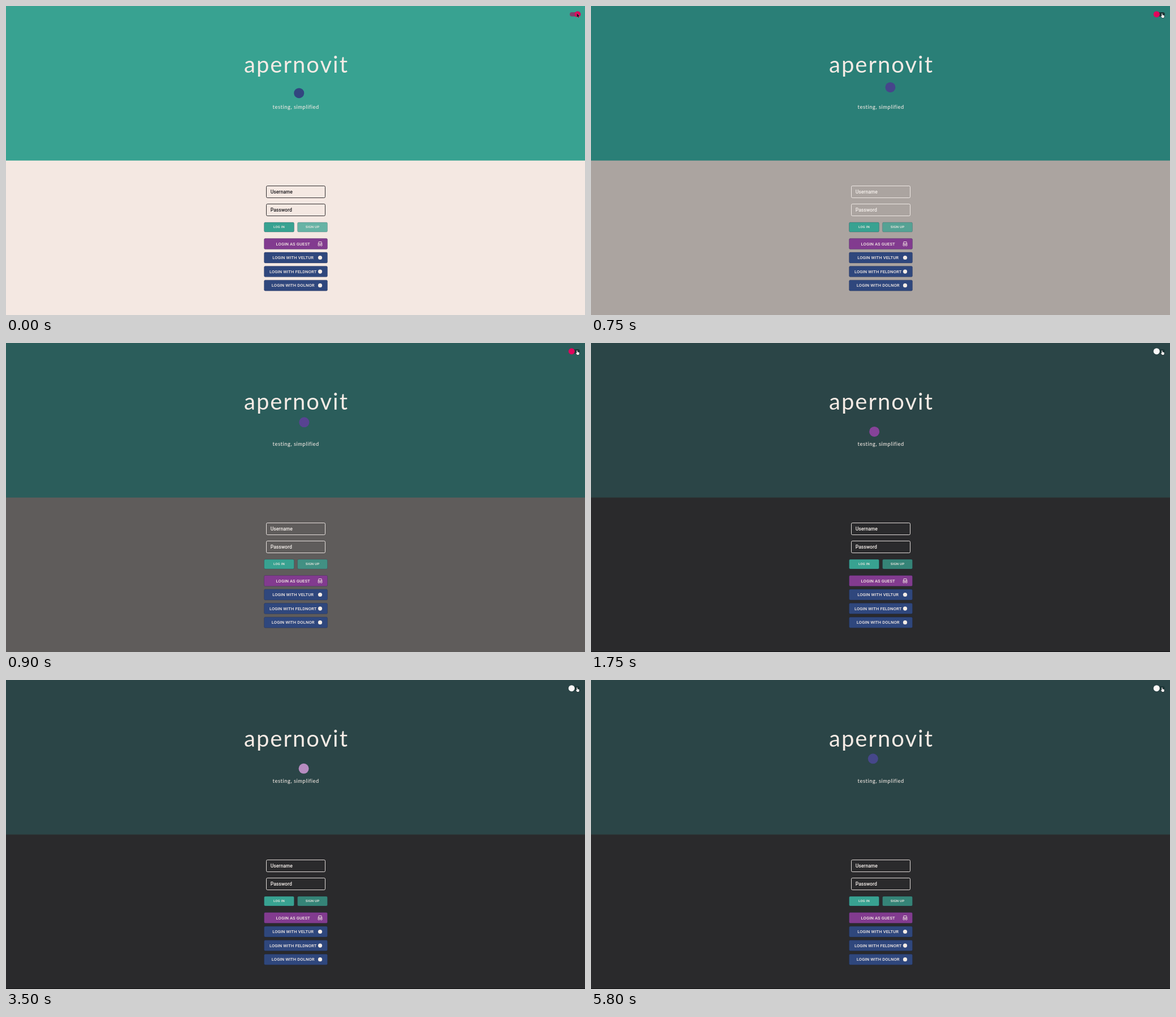
An HTML page with a canvas that plays this animation: 1024 px wide and 547 px high, repeating every 5850 ms.

```html
<!DOCTYPE html>
<html lang="en">
<head>
<meta charset="utf-8">
<title>Login</title>
<style>
  html, body { margin: 0; width: 100%; height: 100%; overflow: hidden; background: #2a2a2c; }
  canvas { display: block; width: 1024px; height: 547px; }
</style>
</head>
<body>
<canvas id="stage"></canvas>
<script>
const W = 1024, H = 547, LOOP = 5850, STEP = 50, SPLIT = 273.6;
const stage = document.getElementById('stage');
const dpr = window.devicePixelRatio || 1;
stage.width = W * dpr;
stage.height = H * dpr;
const ctx = stage.getContext('2d');

const PALE = [245, 235, 229];
const TEAL = '#38a291', PURPLE = '#823b8f', BLUE = '#2f477d';

// The badge fades from blue through lilac and back: [ms, r, g, b]
const BADGE = [
  [0, 50, 70, 127], [750, 70, 69, 139], [900, 88, 67, 146], [1750, 134, 67, 153],
  [3500, 183, 140, 192], [4650, 86, 70, 146], [5850, 69, 71, 138]
];

const clamp = v => Math.min(1, Math.max(0, v));
const span = (t, from, length) => clamp((t - from) / length);
const mix = (a, b, p) => a.map((v, i) => v + (b[i] - v) * p);
const rgb = c => `rgb(${c.map(Math.round).join(',')})`;

// CSS "ease": cubic-bezier(.25, .1, .25, 1)
function ease(x) {
  if (x <= 0 || x >= 1) return clamp(x);
  let lo = 0, hi = 1, s = 0.5;
  for (let i = 0; i < 24; i++) {
    s = (lo + hi) / 2;
    const bx = 0.75 * s * (1 - s) + s * s * s;
    if (bx < x) lo = s; else hi = s;
  }
  return 0.3 * s * (1 - s) ** 2 + 3 * s * s * (1 - s) + s ** 3;
}

function badgeColor(t) {
  const i = Math.max(1, BADGE.findIndex(k => k[0] >= t));
  const a = BADGE[i - 1], b = BADGE[i];
  return rgb(mix(a.slice(1), b.slice(1), span(t, a[0], b[0] - a[0])));
}

function disc(x, y, r, fill) {
  ctx.fillStyle = fill;
  ctx.beginPath();
  ctx.arc(x, y, r, 0, Math.PI * 2);
  ctx.fill();
}

function roundBox(x, y, w, h, r) {
  ctx.beginPath();
  ctx.roundRect(x, y, w, h, r);
}

function label(str, x, y, font, fill, align = 'center', gap = 0) {
  ctx.font = font;
  ctx.letterSpacing = gap + 'px';
  ctx.textAlign = align;
  ctx.textBaseline = 'alphabetic';
  ctx.fillStyle = fill;
  ctx.fillText(str, x, y);
}

function button(x, y, w, h, fill, alpha = 1) {
  ctx.save();
  ctx.globalAlpha = alpha;
  ctx.fillStyle = fill;
  roundBox(x, y, w, h, 2);
  ctx.fill();
  ctx.lineWidth = 1;
  ctx.strokeStyle = 'rgba(20,30,60,.25)';
  ctx.stroke();
  ctx.restore();
}

function field(str, y, ink) {
  ctx.strokeStyle = ink;
  ctx.lineWidth = 0.9;
  roundBox(460.5, y, 104, 21, 2);
  ctx.stroke();
  label(str, 467.7, y + 13.5, '500 8.6px Roboto, sans-serif', ink, 'left');
}

function wideButton(str, y, fill) {
  button(456.5, y, 112, 19, fill);
  label(str, 507.7, y + 12.2, '500 7.5px Roboto, sans-serif', rgb(PALE), 'center', 0.15);
}

function guestIcon(x, y) {
  ctx.strokeStyle = rgb(PALE);
  ctx.lineWidth = 0.9;
  ctx.beginPath();
  ctx.moveTo(x - 3, y);
  ctx.lineTo(x - 2.5, y - 3.5);
  ctx.lineTo(x + 2.5, y - 3.5);
  ctx.lineTo(x + 3, y);
  ctx.moveTo(x - 4, y);
  ctx.lineTo(x + 4, y);
  ctx.stroke();
  for (const side of [-1, 1]) {
    ctx.beginPath();
    ctx.arc(x + side * 2.1, y + 2.3, 1.5, 0, Math.PI * 2);
    ctx.stroke();
  }
}

function shape(points, fill, line) {
  ctx.beginPath();
  points.forEach(([x, y]) => ctx.lineTo(x, y));
  ctx.closePath();
  ctx.lineJoin = 'round';
  ctx.lineWidth = 0.9;
  ctx.strokeStyle = line;
  ctx.fillStyle = fill;
  ctx.stroke();
  ctx.fill();
}

function pointer(t) {
  if (t < 150) {
    shape([[1009.5, 12.5], [1009.5, 20], [1011.2, 18.6], [1012.4, 21], [1013.4, 20.4],
      [1012.4, 18.2], [1014.4, 18]], '#1a1420', 'rgba(235,200,215,.6)');
  } else {
    shape([[1009.2, 13.2], [1010.4, 13.2], [1010.8, 16], [1013.4, 16.6], [1014, 18],
      [1013.2, 21], [1010, 21], [1007.8, 18], [1008.4, 17.4], [1009.4, 18]], '#f4f2f2', '#15191b');
  }
}

function toggle(t) {
  const slide = ease(span(t, 560, 170));
  ctx.fillStyle = rgb(mix([128, 62, 108], [29, 55, 56], slide));
  roundBox(997, 11, 19 - slide, 7.4, 3.7);
  ctx.fill();
  const white = span(t, 1100, 150);
  disc(1011 - 10.7 * slide, 14.7, 5.5, rgb(mix([224, 4, 92], [252, 248, 248], white)));
}

function header(t, dark) {
  const light = mix([56, 162, 145], [42, 160, 146], span(t, 560, 150));
  ctx.fillStyle = rgb(mix(light, [43, 69, 71], dark));
  ctx.fillRect(0, 0, W, SPLIT);

  label('apernovit', 513.5, 118, '40px Lato, sans-serif', rgb(PALE), 'center', 2);

  // Figure-eight drift
  const turn = (t + 180) / 3200 * Math.PI * 2;
  disc(512 + 18 * Math.sin(turn), 148.3 + 9 * Math.sin(2 * turn), 9, badgeColor(t));

  label('testing, simplified', 512.7, 182, '500 9.3px Lato, sans-serif', rgb(PALE), 'center', 0.55);
}

function form(t, dark) {
  ctx.fillStyle = rgb(mix([244, 232, 226], [42, 42, 44], dark));
  ctx.fillRect(0, 0, W, H);

  const ink = rgb(mix([28, 26, 30], [246, 240, 236], span(t, 550, 150)));
  field('Username', 318.5, ink);
  field('Password', 350.5, ink);

  const small = '500 6.1px Roboto, sans-serif';
  button(456.5, 383, 53, 17, TEAL);
  label('LOG IN', 483, 393.4, small, rgb(PALE), 'center', 0.2);
  button(515.5, 383, 53, 17, TEAL, 0.75);
  label('SIGN UP', 542, 393.4, small, rgb(PALE), 'center', 0.2);

  wideButton('LOGIN AS GUEST', 411.5, PURPLE);
  guestIcon(555.5, 421);
  ['VELTUR', 'FELDNORT', 'DOLNOR'].forEach((name, i) => {
    const y = 436 + i * 24.6;
    wideButton('LOGIN WITH ' + name, y, BLUE);
    disc(555.5, y + 9.5, 3.6, rgb(PALE));
  });

  ctx.fillStyle = `rgba(10,10,12,${0.7 * span(t, 1000, 200)})`;
  ctx.fillRect(0, 546, W, 1);
}

function draw(now) {
  let t = Math.floor((now % LOOP) / STEP) * STEP;
  if (t > 300 && t < 600) t = 300; // the scene holds still here
  const dark = ease(span(t, 590, 700));
  ctx.setTransform(dpr, 0, 0, dpr, 0, 0);
  form(t, dark);
  header(t, dark);
  toggle(t);
  pointer(t);
}

const start = performance.now();
function tick() {
  draw(performance.now() - start);
  requestAnimationFrame(tick);
}
tick();
</script>
</body>
</html>
```
